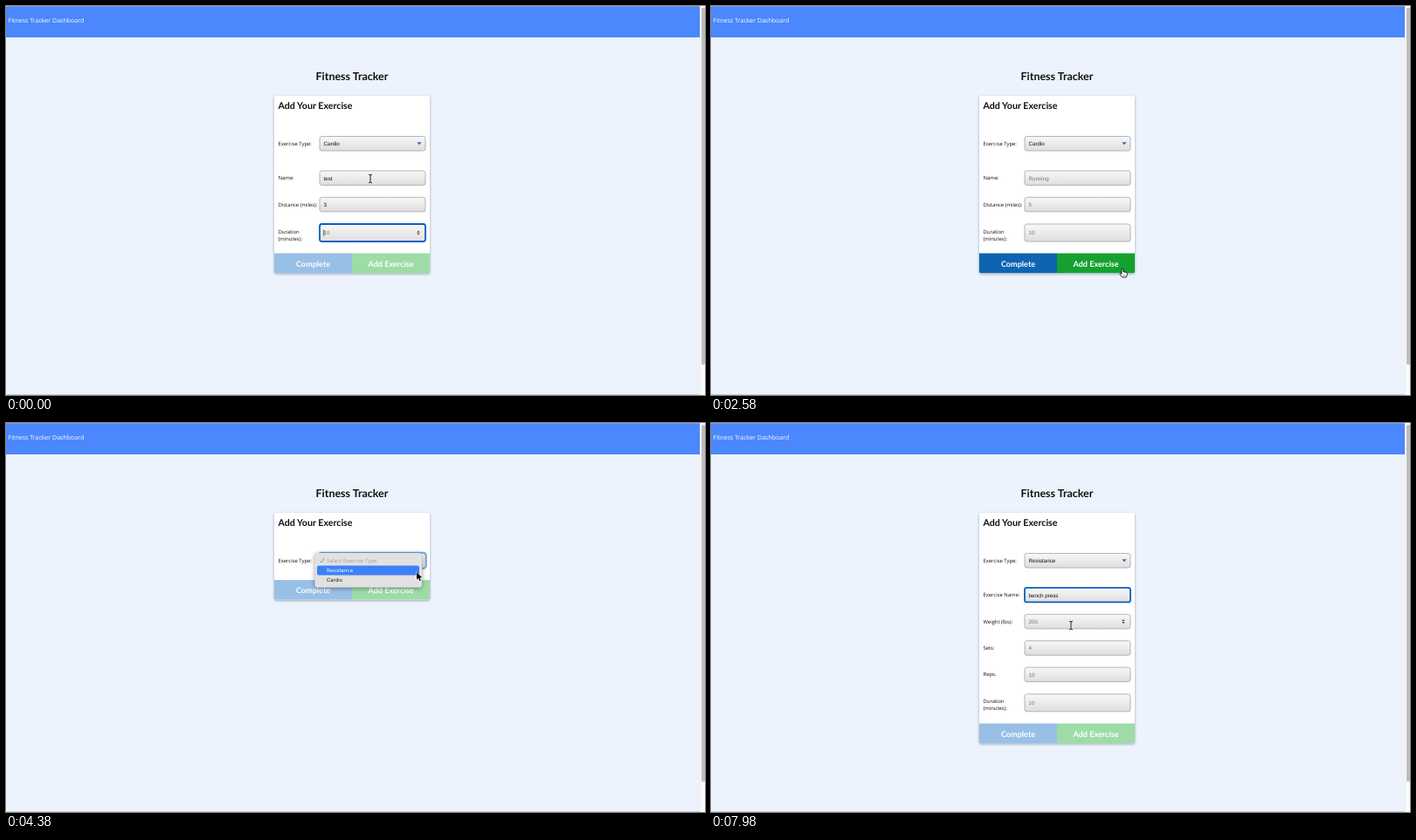
Animation of 800x446 px, one loop 8000 ms. Source, as an HTML page with a canvas:

```html
<!DOCTYPE html>
<html lang="en">
<head>
<meta charset="utf-8">
<title>Fitness Tracker</title>
<style>
  html, body { margin: 0; width: 100%; height: 100%; overflow: hidden; }
  canvas { display: block; width: 100vw; height: 100vh; }
</style>
</head>
<body>
<canvas id="stage" width="800" height="446"></canvas>
<script>
const ctx = document.getElementById('stage').getContext('2d');
ctx.textRendering = 'geometricPrecision';
ctx.textBaseline = 'alphabetic';

const LOOP = 8000, STEP = 60;
const LATO = 'Lato, sans-serif', SANS = '"Open Sans", sans-serif';
const ARIAL = '"Liberation Sans", Arial, sans-serif', UI = 'Inter, sans-serif';
const COLORS = {
  blue: '#1c77ca', blueDark: '#0e64b1', blueOff: '#98bfe6',
  green: '#1cae3c', greenHover: '#14a130', greenOff: '#9ddca6'
};

// Pointer stops: time, x, y, shape on the way to the next stop.
const POINTER = [
  [0, 417, 198, 'beam'], [60, 417, 198, ''], [720, 417, 198, 'beam'],
  [900, 425, 245, 'beam'], [1020, 430, 284, 'hand'], [1200, 432, 296, 'hand'],
  [1680, 432, 297, 'hand'], [2100, 352, 295, 'hand'], [2400, 352, 295, 'hand'],
  [2580, 471, 301, 'hand'], [2640, 470, 312, 'arrow'], [2820, 455, 350, 'arrow'],
  [3120, 440, 270, 'arrow'], [3360, 427, 205, 'hand'], [3840, 427, 204, 'arrow'],
  [4080, 440, 185, 'arrow'], [4200, 462, 158, 'arrow'], [4380, 470, 171, 'arrow'],
  [4800, 462, 169, 'arrow'], [5100, 421, 176, 'arrow'], [5280, 418, 190, 'beam'],
  [5700, 412, 198, 'beam'], [6720, 412, 198, ''], [7860, 412, 200, 'beam'],
  [7980, 412, 232, 'beam']
];

const clamp = v => Math.max(0, Math.min(1, v));
const ease = v => v * v * (3 - 2 * v);

function rect(x, y, w, h, fill) {
  ctx.fillStyle = fill;
  ctx.fillRect(x, y, w, h);
}

function roundRect(x, y, w, h, r, fill, stroke, width = 1) {
  ctx.beginPath();
  ctx.roundRect(x, y, w, h, r);
  if (fill) { ctx.fillStyle = fill; ctx.fill(); }
  if (stroke) { ctx.strokeStyle = stroke; ctx.lineWidth = width; ctx.stroke(); }
}

function polyline(points, color, width = 1) {
  ctx.beginPath();
  points.forEach(([x, y]) => ctx.lineTo(x, y));
  ctx.strokeStyle = color;
  ctx.lineWidth = width;
  ctx.stroke();
}

function text(str, x, y, font, color = '#111', align = 'left') {
  ctx.font = font;
  ctx.fillStyle = color;
  ctx.textAlign = align;
  ctx.fillText(str, x, y);
}

function withShadow(blur, color, draw) {
  ctx.save();
  ctx.shadowColor = color;
  ctx.shadowBlur = blur;
  ctx.shadowOffsetY = 1;
  draw();
  ctx.restore();
}

function drawPage() {
  rect(0, 0, 800, 446, '#ecf3fc');
  rect(0, 0, 794, 36, '#4b87fd');
  rect(0, 0, 794, 1, '#7d9fe0');
  rect(0, 445, 794, 1, '#c9ced6');
  rect(794, 0, 6, 446, '#fafafa');
  rect(794, 0, 0.5, 446, '#e3e3e3');
  roundRect(796, 2, 4, 409.5, 2, '#bcbcbc');
  text('Fitness Tracker Dashboard', 2.5, 19, `7.05px ${SANS}`, '#fff');
  text('Fitness Tracker', 396, 84.5, `700 12.46px ${LATO}`, '#111', 'center');
}

function drawCard(x, w, bottom, buttonTop, labels, fills) {
  const y = 103, mid = x + w / 2, textY = buttonTop + (w > 200 ? 14 : 15);
  withShadow(3, 'rgba(30,50,80,.45)', () => roundRect(x, y, w, bottom - y, 2, '#fff'));
  ctx.save();
  ctx.beginPath();
  ctx.roundRect(x, y, w, bottom - y, 2);
  ctx.clip();
  labels.forEach((label, i) => {
    rect(x + i * w / 2, buttonTop, w / 2, bottom - buttonTop, fills[i]);
    text(label, mid + (i - 0.5) * w / 2, textY, `700 9.1px ${LATO}`, '#fff', 'center');
  });
  ctx.restore();
}

function drawControl(y, h, focus) {
  const fill = ctx.createLinearGradient(0, y, 0, y + h);
  fill.addColorStop(0, '#f8f8f8');
  fill.addColorStop(1, '#dedede');
  if (focus === 'ring') roundRect(358, y - 0.5, 122.5, h + 1, 3, null, '#69a4ee', 2.5);
  roundRect(359, y, 121, h, 2.5, fill, focus === 'line' ? '#0b5fc3' : '#a4a4a4', focus === 'line' ? 1.8 : 0.8);
}

function drawSelect(value, focused) {
  drawControl(149.5, 16.5, focused && 'ring');
  text(value, 363.5, 160.2, `6.23px ${ARIAL}`);
  ctx.beginPath();
  ctx.moveTo(470.5, 156.3);
  ctx.lineTo(475.5, 156.3);
  ctx.lineTo(473, 159.3);
  ctx.fillStyle = '#2861b0';
  ctx.fill();
}

function drawSpinner(y) {
  [-1, 1].forEach(dir => {
    ctx.beginPath();
    ctx.moveTo(470.3, y + dir * 0.5);
    ctx.lineTo(473.7, y + dir * 0.5);
    ctx.lineTo(472, y + dir * 2.6);
    ctx.fillStyle = '#444';
    ctx.fill();
  });
}

function drawField({ label, hint, value = '', focus, caret, spinner }, y) {
  const lines = label.split('|'), tall = lines.length > 1;
  const h = tall ? 20 : 16.5, font = `6.23px ${ARIAL}`;
  lines.forEach((line, i) =>
    text(line, 311.5, y + (tall ? 0.5 + i * 8 : 2), `5.9px ${SANS}`));
  drawControl(y - h / 2, h, focus && 'line');
  text(value || hint, 363.5, y + 2.4, font, value ? '#111' : '#757575');
  if (caret) rect(363.5 + ctx.measureText(value).width, y - 3.5, 0.7, 7, '#111');
  if (spinner) drawSpinner(y);
}

function drawForm(type, fields, fills, selectFocused) {
  const buttonTop = { 0: 180, 3: 283.5, 5: 344.5 }[fields.length];
  drawCard(307, 178, buttonTop + 22.8, buttonTop, ['Complete', 'Add Exercise'], fills);
  text('Add Your Exercise', 311.5, 117.6, `700 10.68px ${LATO}`);
  text('Exercise Type:', 311.5, 159.7, `5.9px ${SANS}`);
  drawSelect(type, selectFocused);
  fields.forEach((field, i) => {
    const tall = field.label.includes('|');
    drawField(field, 197.2 + i * 30.4 + (tall ? 2 : 0));
  });
}

function drawMenu() {
  withShadow(5, 'rgba(0,0,0,.4)', () => roundRect(353.5, 149, 122.5, 39.5, 3, '#e1e1e2'));
  roundRect(356, 163.5, 117, 11, 2, '#3c80f7');
  polyline([[359.5, 158], [361.2, 160], [364.3, 154.8]], '#999', 1);
  const font = `5.85px ${UI}`;
  text('Select Exercise Type', 367, 159.7, font, '#a2a2a2');
  text('Resistance', 367, 171, font, '#fff');
  text('Cardio', 367, 182.3, font, '#222');
}

function drawHome(hoverNew) {
  drawCard(285, 222, 222, 189.5, ['Continue Workout', 'New Workout'],
    [COLORS.blue, hoverNew ? COLORS.greenHover : COLORS.green]);
  text('Last Workout', 396, 126.3, `700 12.46px ${LATO}`, '#111', 'center');
  const stats = [['Date', '3/12/2021'], ['Total Workout Duration', '40'],
    ['Total Distance Covered', '3'], ['Exercises Performed', '2']];
  const bold = `700 5.9px ${SANS}`, plain = `5.9px ${SANS}`;
  stats.forEach(([name, value], i) => {
    const y = 142.6 + i * 10.4, rest = `: ${value}`;
    ctx.font = bold;
    const nameWidth = ctx.measureText(name).width;
    ctx.font = plain;
    const x = 396 - (nameWidth + ctx.measureText(rest).width) / 2;
    text(name, x, y, bold);
    text(rest, x + nameWidth, y, plain);
  });
}

function drawToast(t, start, end) {
  if (t < start || t > end) return;
  const shown = ease(clamp((t - start) / 180)) * ease(clamp((end - t) / 180));
  ctx.save();
  ctx.beginPath();
  ctx.rect(0, 0, 794, 446);
  ctx.clip();
  const x = 794 - 100 * shown;
  roundRect(x, 4.5, 96, 20, 2, '#21ba45');
  text('Workout Added Successfully!', x + 48, 16.7, `6.2px ${SANS}`, '#fff', 'center');
  ctx.restore();
}

const SHAPES = {
  beam() {
    const beam = [[[-2, -5], [0, -4], [2, -5]], [[0, -4], [0, 4]], [[-2, 5], [0, 4], [2, 5]]];
    beam.forEach(line => polyline(line, '#fff', 2));
    beam.forEach(line => polyline(line, '#111', 1));
  },
  arrow() {
    const path = new Path2D('M0 0V8.6L2 6.8 3.4 10 4.9 9.3 3.5 6.3H6.2Z');
    ctx.fillStyle = '#000';
    ctx.strokeStyle = '#fff';
    ctx.lineWidth = 1;
    ctx.stroke(path);
    ctx.fill(path);
  },
  hand() {
    const path = new Path2D('M-1 .8Q0-.6 1 .8V4Q2 3.2 2.6 4.2 3.5 3.6 4 4.6 5.2 4.2 5.3 5.6V7.4L4.2 10H-.3L-3 6.6Q-3.4 5-1 6.2Z');
    ctx.fillStyle = '#fff';
    ctx.strokeStyle = '#111';
    ctx.lineWidth = 0.9;
    ctx.fill(path);
    ctx.stroke(path);
    polyline([[1.1, 7], [1.1, 8.6]], '#111', 0.5);
    polyline([[2.7, 7], [2.7, 8.6]], '#111', 0.5);
  }
};

function drawPointer(t) {
  const i = POINTER.findLastIndex(stop => stop[0] <= t);
  const [t0, x0, y0, shape] = POINTER[i];
  if (!shape) return;
  const [t1, x1, y1] = POINTER[i + 1] || [t0 + 1, x0, y0];
  const k = ease(clamp((t - t0) / (t1 - t0)));
  ctx.save();
  ctx.translate(x0 + (x1 - x0) * k, y0 + (y1 - y0) * k);
  SHAPES[shape]();
  ctx.restore();
}

function drawCardio(t) {
  const cleared = t >= 1380, focus = t < 1260;
  const duration = cleared || t < 120 ? '' : t < 360 ? '4' : '40';
  const hoverAdd = (t >= 1020 && t < 1860) || t >= 2520;
  const fills = t < 120 ? [COLORS.blueOff, COLORS.greenOff]
    : [t >= 1980 ? COLORS.blueDark : COLORS.blue, hoverAdd ? COLORS.greenHover : COLORS.green];
  drawForm('Cardio', [
    { label: 'Name:', hint: 'Running', value: cleared ? '' : 'test' },
    { label: 'Distance (miles):', hint: '5', value: cleared ? '' : '3' },
    { label: 'Duration|(minutes):', hint: '10', value: duration, focus, caret: focus, spinner: focus }
  ], fills);
}

function typedName(t) {
  const first = clamp((t - 6660) / 420) * 5;
  const second = t < 7320 ? 0 : t < 7560 ? 1 : Math.min(6, 2 + (t - 7560) / 60);
  return 'bench press'.slice(0, Math.floor(first + second));
}

function drawResistance(t) {
  const focus = t >= 5880;
  drawForm('Resistance', [
    { label: 'Exercise Name:', hint: 'Bench Press', value: typedName(t), focus, caret: focus && t < 7900 },
    { label: 'Weight (lbs):', hint: '200', spinner: t >= 7950 },
    { label: 'Sets:', hint: '4' },
    { label: 'Reps:', hint: '10' },
    { label: 'Duration|(minutes):', hint: '10' }
  ], [COLORS.blueOff, COLORS.greenOff], !focus);
}

function draw(t) {
  drawPage();
  if (t < 3120) drawCardio(t);
  else if (t < 3840) drawHome(t >= 3360);
  else if (t < 4920) {
    drawForm('Select Exercise Type', [], [COLORS.blueOff, COLORS.greenOff], t >= 4260);
    if (t >= 4260) drawMenu();
  } else drawResistance(t);
  drawToast(t, 1380, 2100);
  drawToast(t, 2640, 3120);
  drawPointer(t);
}

function tick() {
  const t = performance.now() % LOOP;
  draw(Math.floor(t / STEP) * STEP);
  requestAnimationFrame(tick);
}
tick();
</script>
</body>
</html>
```
